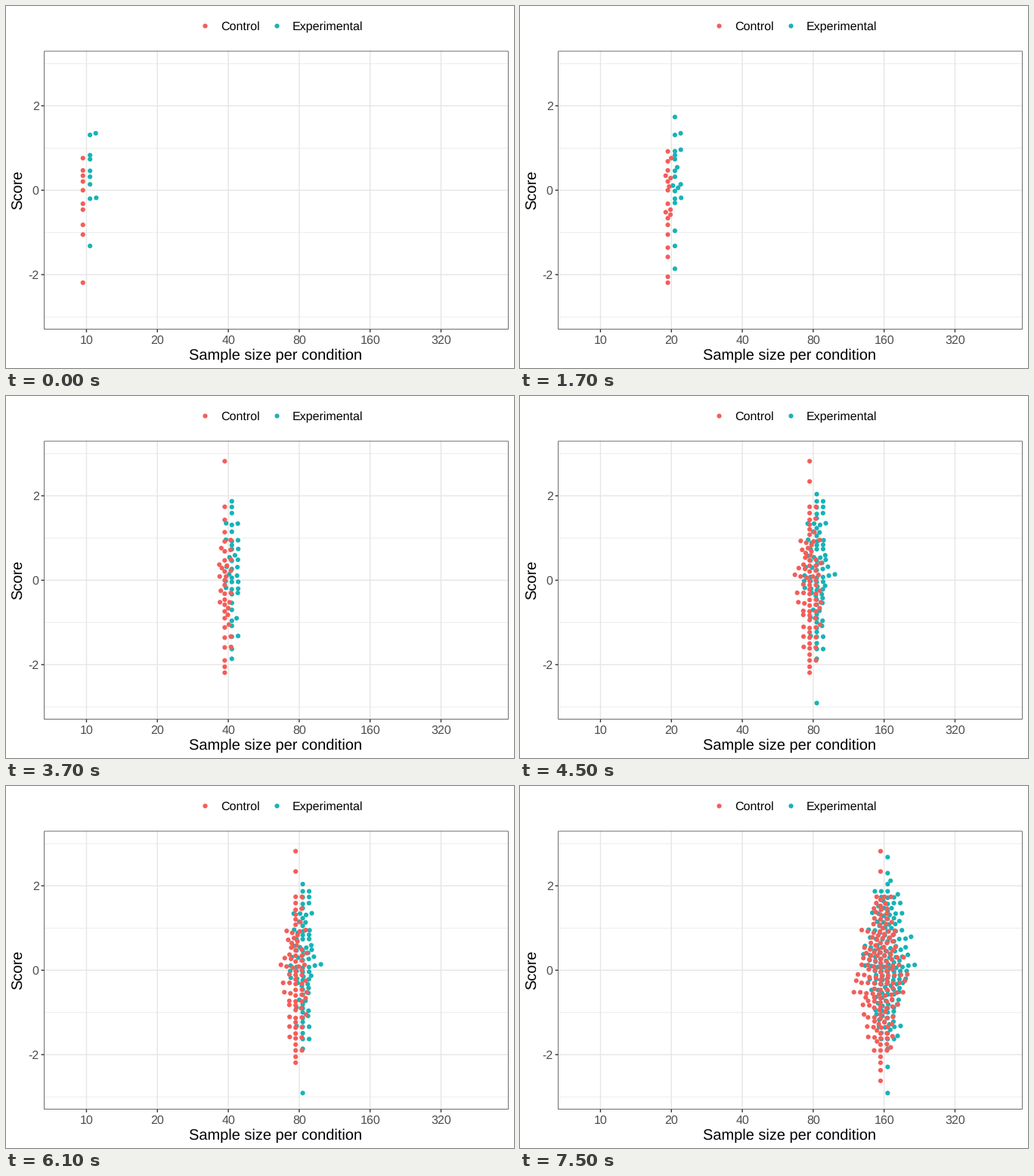
Animation of 672 by 480 pixels, one loop 8 s. Source, as a matplotlib script:

```python
import numpy as np
import matplotlib.pyplot as plt
from matplotlib.animation import FuncAnimation

W, H, DPI = 672, 480, 96
PX = 72 / DPI                      # points per pixel
LEFT, RIGHT, TOP, BOTTOM = 50.3, 664.67, 59.6, 429.0
STEP, UNIT, MID = 93.8, 55.97, 244.3
SPACING, DODGE = 0.09, 0.05
SIZES = [10 * 2 ** k for k in range(6)]
RED, TEAL = "#F35E5A", "#17B3B7"
INK, LABEL, GRID = "#333333", "#4D4D4D", "#E6E6E6"

plt.rcParams.update({
    "font.family": "Liberation Sans",
    "path.snap": False,
    "text.hinting": "none",
    "axes.unicode_minus": False,
})


def spread(count, center, reach, rng):
    """Jittered values, dense around the center and thinning to the ends."""
    u = np.linspace(-1, 1, count)
    jitter = rng.normal(0, 0.03, count) * (1 - u ** 2)
    return center + reach * (0.7 * u + 0.3 * u ** 3 + jitter)


def grow(start, outliers, center, reach, seed):
    """Samples of doubling size; each one keeps the values before it."""
    rng = np.random.default_rng(seed)
    samples = [np.array(start[:10]), np.array(start)]
    for extra in outliers:
        last = samples[-1]
        new = spread(len(last) - len(extra), center, reach, rng)
        samples.append(np.concatenate([last, extra, new]))
    return samples


def swarm(values):
    """Place values in ascending order, each as near the middle as it fits."""
    ys = np.sort(values)
    xs = np.zeros(len(ys))
    for i, y in enumerate(ys):
        near = np.flatnonzero(y - ys[:i] < SPACING)
        gap = np.sqrt(SPACING ** 2 - (y - ys[near]) ** 2)
        spots = np.concatenate([[0], xs[near] + gap, xs[near] - gap])
        free = [s for s in spots
                if np.all(np.abs(s - xs[near]) >= gap - 1e-9)]
        xs[i] = min(free, key=abs)
    return xs, ys


def x_px(level):
    return 106.45 + STEP * np.asarray(level)


def y_px(score):
    return MID - UNIT * np.asarray(score)


# The first twenty scores of each group, then its outliers per doubling
control = grow(
    [0.761, 0.47, 0.345, 0.207, 0, -0.32, -0.46, -0.82, -1.05, -2.19,
     0.92, 0.685, 0.288, 0.088, -0.52, -0.58, -0.662, -1.36, -1.58, -2.05],
    outliers=[[2.82], [2.34], [-2.37, -2.62]],
    center=-0.08, reach=1.82, seed=7)
experimental = grow(
    [1.35, 1.31, 0.83, 0.735, 0.46, 0.32, 0.14, -0.18, -0.20, -1.32,
     1.735, 0.925, 0.96, 0.544, 0.11, 0.058, -0.02, -0.30, -0.96, -1.86],
    outliers=[[], [2.04, -2.91], [2.68, 2.3, 2.12, -2.29]],
    center=0.12, reach=1.75, seed=11)

fig = plt.figure(figsize=(W / DPI, H / DPI), dpi=DPI, facecolor="white")
ax = fig.add_axes([0, 0, 1, 1])
ax.set(xlim=(0, W), ylim=(H, 0))
ax.axis("off")


def line(x0, y0, x1, y1, width, color):
    ax.plot([x0, x1], [y0, y1], color=color, lw=width * PX, zorder=1,
            solid_capstyle="butt")


def text(x, y, label, size, color="black", ha="center", **kw):
    ax.text(x, y, label, fontsize=size * PX, color=color, ha=ha,
            va="baseline", **kw)


def dots(x, y, color, z=3):
    return ax.scatter(x, y, s=np.full(len(x), (6.2 * PX) ** 2), c=color,
                      linewidths=0, zorder=z)


# Grid, ticks and border
for score in range(-3, 4, 2):
    line(LEFT, y_px(score), RIGHT, y_px(score), 0.71, GRID)
for score in range(-2, 3, 2):
    y = y_px(score)
    line(LEFT, y, RIGHT, y, 1.42, GRID)
    line(LEFT - 3.67, y, LEFT, y, 1.42, INK)
    text(43.7, y + 5.9, str(score), 16, LABEL, "right")
for level, n in enumerate(SIZES):
    x = x_px(level)
    line(x, TOP, x, BOTTOM, 1.42, GRID)
    line(x, BOTTOM, x, BOTTOM + 3.67, 1.42, INK)
    text(x, 448, str(n), 16, LABEL)
inset = 0.355
ax.add_patch(plt.Rectangle(
    (LEFT + inset, TOP + inset), RIGHT - LEFT - 2 * inset,
    BOTTOM - TOP - 2 * inset, fill=False, ec=INK, lw=0.71 * PX, zorder=6))

# Titles and legend
text((LEFT + RIGHT) / 2 - 0.6, 469, "Sample size per condition", 20)
text(22, MID, "Score", 20, rotation=90, rotation_mode="anchor")
for x, name, color in ((263.1, "Control", RED), (357.6, "Experimental", TEAL)):
    dots([x], [26.4], color)
    text(x + 21.2, 32, name, 16, ha="left")

# One pair of swarms per sample size
stages = []
for level, samples in enumerate(zip(experimental, control)):
    pair = []
    for values, side, color, z in zip(samples, (1, -1), (TEAL, RED), (3, 4)):
        xs, ys = swarm(values)
        pair.append(dots(x_px(level + side * DODGE + xs), y_px(ys), color, z))
    stages.append(pair)

timeline = np.repeat(np.arange(5), [1, 4, 4, 4, 3])    # half-second steps


def update(i):
    for level, pair in enumerate(stages):
        for group in pair:
            group.set_visible(level == timeline[i])
    return [group for pair in stages for group in pair]


anim = FuncAnimation(fig, update, frames=len(timeline), interval=500,
                     repeat=True, repeat_delay=0, blit=False)
plt.show()
```
